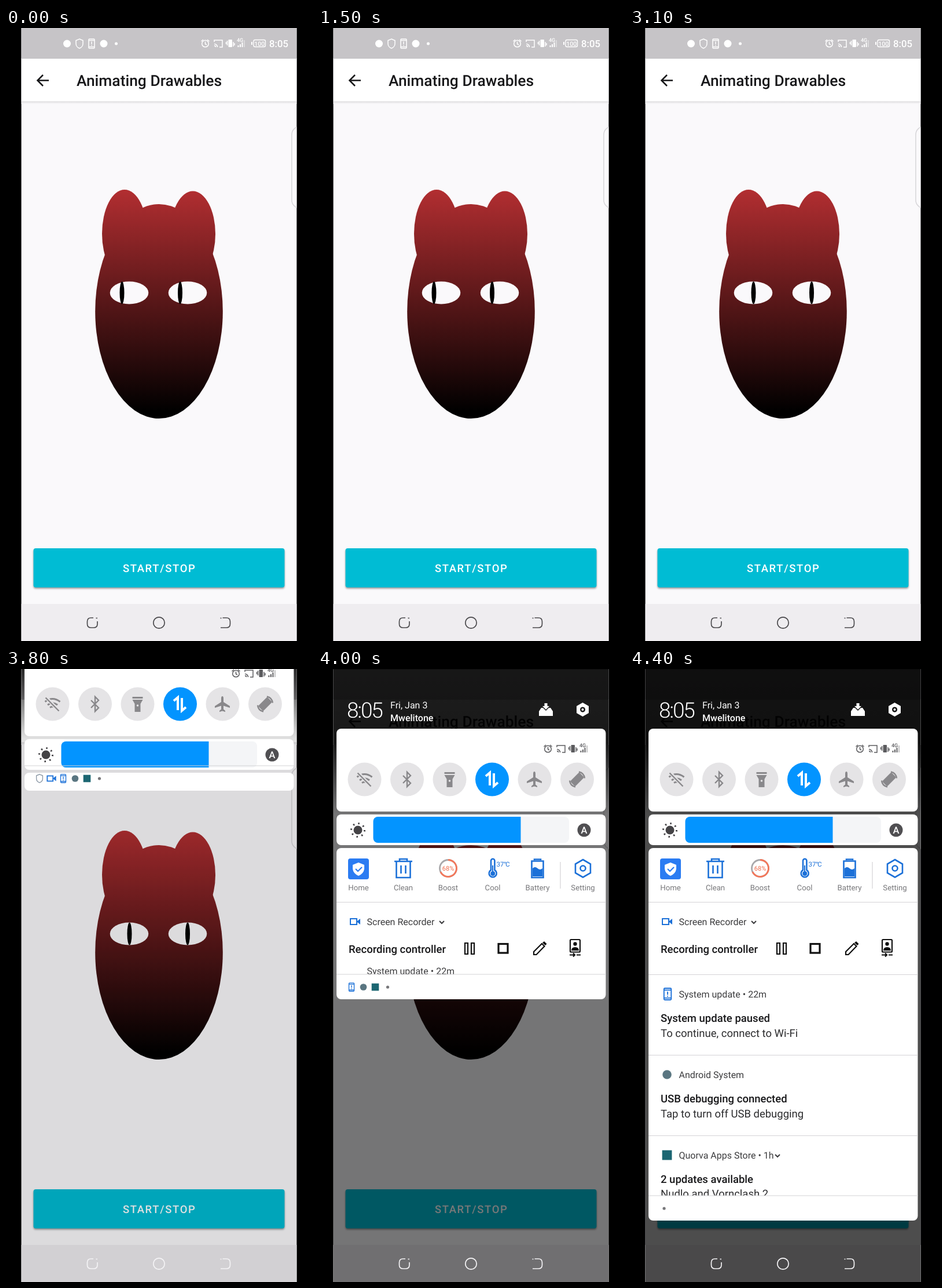
These frames come from a looping animation (529 by 1058 pixels, 4500 ms). An HTML page:

```html
<!DOCTYPE html>
<html lang="en">
<head>
<meta charset="utf-8">
<title>Animating Drawables</title>
<style>
  html, body { margin: 0; width: 100%; height: 100%; overflow: hidden; background: #000; }
  svg { display: block; width: 100vw; height: 100vh; font-family: Roboto, sans-serif; text-rendering: geometricPrecision; }
  .m { font-weight: 500; }
  .line { fill: none; stroke: currentColor; }
  .mid { text-anchor: middle; }
  .head { font-size: 16px; fill: #3c3c3e; }
  .body { font-size: 18.5px; fill: #2c2c2e; }
  .title { font-size: 18.5px; font-weight: 500; fill: #18181a; }
  .label { font-size: 13.2px; fill: #77777a; text-anchor: middle; }
  .rule { fill: none; stroke: #d4d3d6; stroke-width: 1.2; }
  .card { fill: #fff; }
</style>
</head>
<body>
<svg viewBox="0 0 529 1058">
  <defs>
    <linearGradient id="fur" gradientUnits="userSpaceOnUse" x1="0" y1="279" x2="0" y2="662">
      <stop stop-color="#b22e31"/><stop offset="1" stop-color="#000"/>
    </linearGradient>
    <linearGradient id="dark" x2="0" y2="1">
      <stop stop-opacity=".75"/><stop offset=".5" stop-opacity=".8"/><stop offset="1" stop-opacity="0"/>
    </linearGradient>
    <linearGradient id="drop" x2="0" y2="1">
      <stop stop-color="#d9d8da"/><stop offset="1" stop-color="#faf9fb"/>
    </linearGradient>
    <clipPath id="screen"><rect x="26.5" width="476" height="1058"/></clipPath>
    <clipPath id="btn"><rect x="47.5" y="898" width="434" height="67.5" rx="4"/></clipPath>
    <clipPath id="list"><rect id="listClip" x="32" y="309" width="465.5"/></clipPath>

    <!-- icons centred on 0,0 -->
    <g id="shield"><path class="line" stroke-width="1.5" d="M0-8 6-5.500V0C6 4 3 7 0 8-3 7-6 4-6 0V-5.500Z"/></g>
    <g id="update">
      <rect class="line" x="-5" y="-8" width="10" height="16" rx="1.200" stroke-width="1.500"/>
      <path class="line" stroke-width="1.500" d="M-5-5.500H5M-5 5.500H5M0-3.500V1M0 2.300V3.800"/>
    </g>
    <g id="cam">
      <rect class="line" x="-8" y="-5" width="11" height="10" stroke-width="2"/>
      <path fill="currentColor" d="M4-1 9-5V5L4 1Z"/>
    </g>
    <g id="pie"><circle r="6.500" fill="currentColor"/></g>
    <g id="shop"><rect x="-7" y="-7" width="14" height="14" fill="currentColor"/></g>
    <g id="down"><path class="line" stroke-width="2" d="M-4-2 0 2 4-2"/></g>

    <g id="signals">
      <circle class="line" cx="344.500" cy="27" r="5.800" stroke-width="1.500"/>
      <path class="line" stroke-width="1.500" d="M344.500 23.500V27.500L347 29M337.500 23 341 20M351.500 23 348 20"/>
      <path class="line" stroke-width="1.500" d="M360 24V21H374V33H369M360 27.500A5.500 5.500 0 0 1 365.500 33M360 30.500A2.500 2.500 0 0 1 362.500 33"/>
      <rect x="384.500" y="20" width="6.500" height="13" rx="1" fill="currentColor"/>
      <path class="line" stroke-width="1.500" d="M382.500 22V30M380.500 24V28M393 24V32M395 26V30"/>
      <text class="m" x="399" y="24" font-size="9" fill="currentColor">4G</text>
      <path class="line" stroke-width="2" d="M401.500 33V30M405 33V28M408.500 33V25"/>
      <path class="line" stroke-width="1.500" opacity=".5" d="M412 33V21"/>
    </g>
  </defs>

  <rect width="529" height="1058"/>
  <g clip-path="url(#screen)">
    <rect width="529" height="1058" fill="#faf9fb"/>
    <rect y="126" width="529" height="5" fill="url(#drop)"/>
    <rect y="52" width="529" height="74.500" fill="#fff"/>
    <rect width="529" height="53" fill="#c6c4c7"/>
    <rect y="994" width="529" height="64" fill="#efedf0"/>

    <g id="status" color="#fff" fill="#fff">
      <circle cx="105.500" cy="27" r="6.500"/>
      <use href="#shield" x="127" y="27"/>
      <use href="#update" x="148" y="27"/>
      <use href="#pie" x="169" y="27"/>
      <circle cx="190.500" cy="27" r="2.500"/>
      <use href="#signals"/>
      <rect class="line" x="428" y="20.500" width="20.500" height="12" rx="2.500" stroke-width="1.400"/>
      <rect x="424" y="24" width="2" height="5"/>
      <text class="m mid" x="438.300" y="30.500" font-size="10.500">100</text>
      <text class="m" x="455" y="33" font-size="16.800">8:05</text>
    </g>

    <path d="M74 90.500H55M64 81 54.500 90.500 64 100" fill="none" stroke="#18181a" stroke-width="2.600"/>
    <text class="m" x="122" y="100" font-size="26.400" fill="#18181a">Animating Drawables</text>
    <rect x="494" y="170" width="30" height="141" rx="14" fill="#fbfafc" stroke="#d8d7da" stroke-width="1.600"/>

    <g fill="url(#fur)">
      <ellipse cx="205" cy="355" rx="39" ry="76"/>
      <ellipse cx="323" cy="355.500" rx="39" ry="74"/>
      <ellipse cx="264.500" cy="489" rx="110.300" ry="185"/>
    </g>
    <g fill="#faf9fb">
      <ellipse cx="213" cy="457" rx="33.300" ry="19.600"/>
      <ellipse cx="314" cy="457" rx="33.300" ry="19.600"/>
    </g>
    <g id="pupils">
      <ellipse cx="213.500" cy="457" rx="4" ry="19.600"/>
      <ellipse cx="314" cy="457" rx="4" ry="19.600"/>
    </g>

    <rect x="47.500" y="898" width="434" height="67.500" rx="4" fill="#00bcd4" style="filter:drop-shadow(0 2px 1.500px #0006)"/>
    <circle id="ripple" cx="264" cy="932" fill="#fff" clip-path="url(#btn)"/>
    <text class="m mid" x="265.300" y="939" font-size="18.500" letter-spacing="1.650" fill="#fff">START/STOP</text>

    <rect id="scrim" width="529" height="1058"/>
    <g id="nav" class="line" stroke-width="1.700">
      <path d="M151 1018H147Q140.500 1018 140.500 1024.500V1028.500Q140.500 1035 147 1035H151.500Q158 1035 158 1028.500V1024M155.500 1018.500H158"/>
      <circle cx="264.500" cy="1026.500" r="9.700"/>
      <path d="M374.500 1018H381Q387.500 1018 387.500 1024.500V1028.500Q387.500 1035 381 1035H371M370.500 1018.500H372.500"/>
    </g>

    <g id="shade">
      <rect y="-140" width="529" height="140.500" opacity=".75"/>
      <rect width="529" height="250" fill="url(#dark)"/>
      <text x="50" y="84" font-size="37" font-weight="300" letter-spacing="-2.200" fill="#fff">8:05</text>
      <text x="125" y="68" font-size="16" fill="#fff">Fri, Jan 3</text>
      <text class="m" x="125" y="90" font-size="16" fill="#fff">Mwelitone</text>
      <path fill="#fff" d="M382 73 386 67H389L394 72 399 67H402L406 73V81H382ZM391.500 59H396.500V64H400L394 70 388 64H391.500Z"/>
      <path fill="#fff" fill-rule="evenodd" d="M457.500 58 468 64V76L457.500 82 447 76V64ZM457.500 65.500a4.500 4.500 0 1 0 .1 0Z"/>
      <circle cx="457.500" cy="70" r="2" fill="#fff"/>

      <rect class="card" x="32" y="103" width="465.500" height="143" rx="8"/>
      <use href="#signals" x="53" y="111" color="#5c5c5f"/>
      <g id="toggles"></g>
      <g transform="translate(80.500 190.500)" fill="none" stroke="#89888b" stroke-width="3">
        <path d="M-13-4Q0-14 13-4M-8.500 1.500Q0-5 8.500 1.500M-4.500 6Q0 3 4.500 6"/>
        <path d="M-11-11 11 12" stroke="#e5e4e6" stroke-width="6"/><path d="M-12-11 11 12" stroke-width="2.400"/>
      </g>
      <path d="M147 184 160 197 154 203V178L160 184 147 197" fill="none" stroke="#89888b" stroke-width="2.400"/>
      <path d="M218.500 178H236.500V181H218.500ZM218.500 183H236.500L232.500 190V204H222.500V190Z" fill="#89888b"/>
      <circle cx="227.500" cy="193" r="1.800" fill="#e5e4e6"/>
      <path d="M290 185 297 179V201M311 196 304 202V180" fill="none" stroke="#fff" stroke-width="4"/>
      <path fill="#89888b" d="M374 177Q376 177 376 181V187L387 194V197L376 193.500V199.500L379 202V204L374 202.500 369 204V202L372 199.500V193.500L361 197V194L372 187V181Q372 177 374 177Z"/>
      <g transform="translate(448 190.500)" fill="none" stroke="#89888b" stroke-width="2.400">
        <rect x="-5" y="-10" width="10" height="20" rx="1" fill="#89888b" transform="rotate(45)"/>
        <path d="M3-13Q12-11 13-2M-3 13Q-12 11-13 2"/>
      </g>

      <rect class="card" x="32" y="251" width="465.500" height="53" rx="8"/>
      <circle cx="69" cy="278" r="7.500" fill="#444346"/>
      <circle cx="69" cy="278" r="11.500" fill="none" stroke="#444346" stroke-width="3" stroke-dasharray="2.500 6.530"/>
      <rect x="95.500" y="255" width="338.500" height="45" rx="8" fill="#f4f5f7"/>
      <path d="M350.500 255V300H103.500a8 8 0 0 1-8-8V263a8 8 0 0 1 8-8Z" fill="#0394ff"/>
      <circle cx="460" cy="278" r="11.500" fill="#504f52"/>
      <text class="m mid" x="460" y="284" font-size="16.500" fill="#fff">A</text>

      <rect id="panel" class="card" x="32" y="309" width="465.500" rx="8"/>
      <g clip-path="url(#list)" color="#1b70d8">
        <g class="row">
          <rect x="52" y="327" width="36" height="36" rx="4" fill="#2b7cf2"/>
          <path d="M70 334 80 338V345Q79 353 70 357 61 353 60 345V338Z" fill="#fff"/>
          <path d="M65 345 69 349 76 342" fill="none" stroke="#2b7cf2" stroke-width="2.200"/>
          <g class="line" stroke-width="2.600">
            <path d="M132 332H163M141 331V328H154V331M135.500 333V360H159.500V333M143.500 339V353M151.500 339V353"/>
            <path d="M299 347V331a3.200 3.200 0 0 1 6.400 0V347a6.500 6.500 0 1 1-6.400 0Z"/>
            <path d="M374 330V328.500H385V330M369.500 331.500H389.500V360H369.500Z"/>
            <path d="M458 329 471 336.500V352L458 359.500 445 352V336.500Z"/>
            <circle cx="458" cy="344" r="4.500"/>
          </g>
          <circle cx="302.200" cy="353" r="4" fill="currentColor"/>
          <path d="M302 353V339" stroke="currentColor" stroke-width="2"/>
          <path d="M371 344Q375 340 379.500 344T388 344V358H371Z" fill="currentColor"/>
          <circle cx="225" cy="344" r="14.500" fill="none" stroke="#a9a8ab" stroke-width="2.800"/>
          <path d="M225 329.500A14.500 14.500 0 1 1 211.800 350" fill="none" stroke="#f4775a" stroke-width="2.800"/>
          <text class="mid" x="225" y="348" font-size="11" fill="#f06a4a">68%</text>
          <text x="308.500" y="341" font-size="11.500" fill="currentColor">37℃</text>
          <path class="rule" d="M419 333V379"/>
          <text class="label" x="70" y="382">Home</text>
          <text class="label" x="147.500" y="382">Clean</text>
          <text class="label" x="225" y="382">Boost</text>
          <text class="label" x="302" y="382">Cool</text>
          <text class="label" x="379.500" y="382">Battery</text>
          <text class="label" x="458" y="382">Setting</text>
        </g>
        <path class="rule" d="M32 402.500H498M32 527.500H498M32 666.500H498M32 805.500H498"/>
        <g class="row">
          <use class="icon" href="#cam" x="64" y="436"/>
          <text class="head" x="84.500" y="442">Screen Recorder</text>
          <use href="#down" x="214" y="437" color="#3c3c3e"/>
          <text class="title" x="53" y="489.500">Recording controller</text>
          <g fill="none" stroke="#111" stroke-width="2.200">
            <path d="M254 473H259V492H254ZM265 473H270V492H265Z"/>
            <rect x="312" y="474.500" width="16" height="15.500" stroke-width="3.200"/>
            <path d="M373 493V488L387 474 391.500 478.500 377.500 493Z"/>
            <path d="M388 472.500 391 470 395.500 474.500 393 477Z" fill="#111" stroke="none"/>
            <rect x="436" y="467" width="17" height="21.500" rx="1.500"/>
            <circle cx="444.500" cy="474.500" r="3.200" fill="#111" stroke="none"/>
            <path d="M438 486Q438 480 444.500 480T451 486Z" fill="#111" stroke="none"/>
            <path d="M435 493.500H443M447 493.500H454M441 490.500 444 493.500 441 496.500"/>
          </g>
        </g>
        <g class="row">
          <use class="icon" href="#update" transform="translate(65 561) scale(1.250)"/>
          <text class="head" x="84.500" y="567">System update • 22m</text>
          <text class="title" x="53" y="608.500">System update paused</text>
          <text class="body" x="53" y="634.500">To continue, connect to Wi-Fi</text>
        </g>
        <g class="row">
          <use class="icon" href="#pie" transform="translate(64 700) scale(1.200)" color="#5a7681"/>
          <text class="head" x="84.500" y="705.500">Android System</text>
          <text class="title" x="53" y="747.500">USB debugging connected</text>
          <text class="body" x="53" y="773.500">Tap to turn off USB debugging</text>
        </g>
        <g class="row">
          <use class="icon" href="#shop" transform="translate(64 839) scale(1.200)" color="#1c6672"/>
          <text class="head" x="84.500" y="844.500">Quorva Apps Store • 1h</text>
          <use href="#down" x="255" y="840" color="#3c3c3e"/>
          <text class="title" x="53" y="886.500">2 updates available</text>
          <text class="body" x="53" y="912">Nudlo and Vornclash 2</text>
        </g>
      </g>
      <path id="edge" class="rule" d="M32 0H498"/>
      <g id="shelf"></g>
    </g>
  </g>
</svg>
<script>
const $ = id => document.getElementById(id);
const set = (el, attrs) => { for (const k in attrs) el.setAttribute(k, attrs[k]); return el; };
const add = (parent, tag, attrs) =>
  parent.appendChild(set(document.createElementNS('http://www.w3.org/2000/svg', tag), attrs));
const clamp = v => Math.max(0, Math.min(1, v));

for (let i = 0; i < 6; i++)
  add($('toggles'), 'circle', { cx: 80.5 + 73.5 * i, cy: 190.5, r: 29, fill: i === 3 ? '#0394ff' : '#e5e4e6' });

const rows = [...document.querySelectorAll('.row')];
const tops = [309, 402, 527, 666, 805, 944];
const icons = [['shield', '#8a97a5'], ['cam', '#1b70d8'], ['update', '#1b70d8'], ['pie', '#5a7681'], ['shop', '#1c6672']]
  .map(([id, color]) => add($('shelf'), 'use', { href: '#' + id, color }));
const dot = add($('shelf'), 'circle', { r: 2.6, fill: '#77777a' });

// panel bottom for each 100 ms step from 3800
const bottoms = [340, 374, 570, 746, 845, 912, 952];
const scrims = [.12, .37, .53, .69];

function drawPanel(bottom) {
  const shelf = bottom - 43;
  set($('panel'), { height: bottom - 309 });
  set($('listClip'), { height: Math.max(0, shelf - 309) });
  let x = 58, full = true;
  rows.forEach((row, i) => {
    const shown = shelf - tops[i];
    const leaving = shown > 0 && shown < 67;
    const waiting = shown <= 0;
    set(row, { transform: `translate(0 ${shown < 67 ? .6 * shown - 40 : 0})` });
    const icon = row.querySelector('.icon');
    if (icon) set(icon, { opacity: shown < 67 ? 0 : 1 });
    const y = leaving ? shelf - 7 : bottom - 21;
    set(icons[i], { opacity: leaving || waiting ? 1 : 0, transform: `translate(${x} ${y}) scale(.9)` });
    if (leaving || waiting) x += 20.5;
    if (leaving) full = false;
  });
  set(dot, { cx: x + 1, cy: bottom - 21 });
  set($('edge'), { transform: `translate(0 ${shelf})`, opacity: full ? 1 : 0 });
}

function look(t) {
  if (t < 600) return -13;
  if (t < 1000) return 13;
  if (t < 1500) return 0;
  if (t < 1900) return -13;
  return t < 2300 ? 13 : 0;
}

function draw(t) {
  set($('pupils'), { transform: `translate(${look(t)} 0)` });
  set($('ripple'), {
    r: 240 * clamp((t - 2300) / 200),
    opacity: .5 * clamp((2700 - t) / 200)
  });
  const step = Math.floor((t - 3800) / 100);
  const open = step >= 0;
  $('shade').style.display = open ? '' : 'none';
  $('status').style.display = open ? 'none' : '';
  set($('scrim'), { opacity: open ? scrims[Math.min(step, 3)] : 0 });
  set($('nav'), { color: open ? '#f4f3f5' : '#4c4b4e' });
  if (open) {
    set($('shade'), { transform: `translate(0 ${step ? 0 : -130})` });
    drawPanel(bottoms[step]);
  }
}

const start = performance.now();
function tick() {
  const t = (performance.now() - start) % 4500;
  draw(Math.floor(t / 100) * 100);
  requestAnimationFrame(tick);
}
tick();
</script>
</body>
</html>
```
